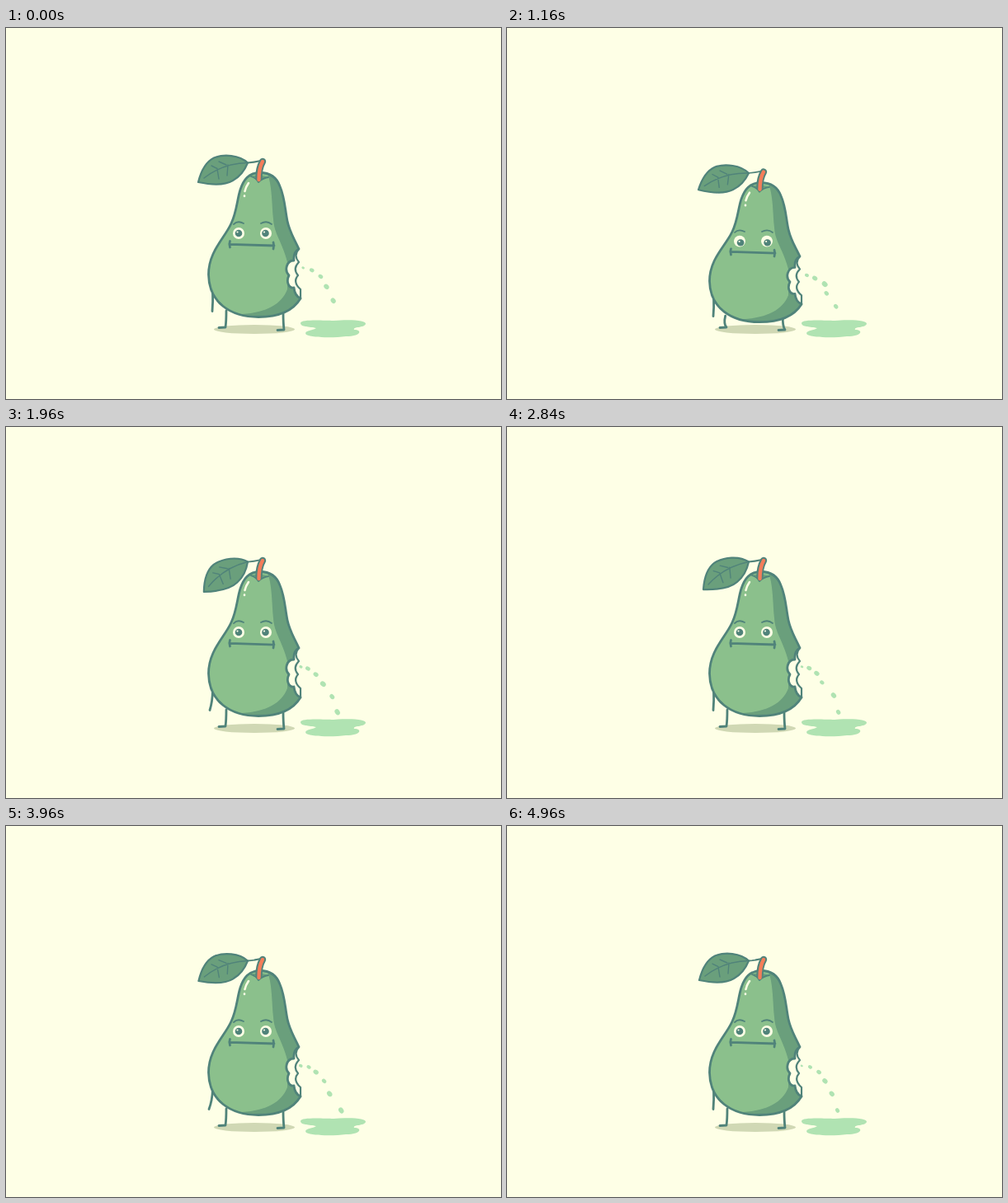
These frames come from a looping animation (600x450 px, 5 s). An HTML page:

```html
<!DOCTYPE html>
<html>
<head>
<meta charset="utf-8">
<style>
  html, body { margin: 0; width: 100%; height: 100%; overflow: hidden; background: #feffe6; }
  svg { display: block; width: 100vw; height: 100vh; }
  .line { fill: none; stroke: #50837a; stroke-width: 2.8; stroke-linecap: round; stroke-linejoin: round; }
  .thin { stroke-width: 1.8; }
  .cream { fill: #feffe6; }
  .dark { fill: #6a9f7c; }
  .juice { fill: #b0e3b2; }
</style>
</head>
<body>
<svg viewBox="0 0 600 450">
  <defs>
    <path id="pear" d="M355 268C349 255 344 248 341 234C338 219 338 206 332 192C328 181 320 175.500 308 175.500C294 175.500 288 184 284 196C280 208 280 222 273 237C265 255 245.500 271 245.500 299C246 333 272 350.500 306 350.500C330 350.500 348 343 357 328Q350 325 349 315C343 316 339 308 343 300C337 294 340 282 349 282Q348 272 355 268Z"/>
    <clipPath id="inside"><use href="#pear"/></clipPath>
  </defs>

  <ellipse cx="301" cy="365.5" rx="49" ry="5.5" fill="#d0d8b4"/>
  <path class="juice" d="M357 358C357 353 385 355 397 355C420 353 437 355 436 359C434 364 420 362 422 366C432 366 431 374 412 374C398 376 372 376 364 372C360 367 372 367 376 364C368 362 357 363 357 358Z"/>
  <path id="legs" class="line"/>
  <path id="arm" class="line"/>

  <g id="body">
    <path class="cream" d="M355 268Q348 276 355 284Q347 292 354 300Q347 308 357 317V328L347 318L339 306V290L349 278Z"/>
    <use href="#pear" fill="#8bc08c"/>
    <path class="dark" clip-path="url(#inside)" d="M316 174C323 190 322 215 324 232C325 250 335 260 341 284V317C334 335 316 345 286 347V356H364V174Z"/>
    <use href="#pear" class="line"/>
    <path class="line" style="stroke-width:2.2" d="M355 268Q348 276 355 284Q347 292 354 300Q347 308 357 317V328"/>
    <path d="M294 188Q290.500 193 289.500 198M289 203.500v.5" fill="none" stroke="#feffe6" stroke-width="2.6" stroke-linecap="round"/>

    <circle class="cream" cx="282" cy="249" r="7"/>
    <circle class="cream" cx="315" cy="249" r="7"/>
    <g id="pupils">
      <circle cx="282" cy="249" r="4.300" fill="#50837a"/>
      <circle cx="314.500" cy="249" r="4.300" fill="#50837a"/>
      <circle class="cream" cx="280.500" cy="247.500" r="1.100"/>
      <circle class="cream" cx="313" cy="247.500" r="1.100"/>
    </g>
    <path class="line thin" d="M276 238Q281 233 288 237M309 237Q316 233 322 238"/>
    <path class="line" d="M271 262.300L325 264M271.500 258.500Q270 262 271.500 266M324 260Q325.500 264 324 268"/>

    <path class="dark" d="M297 180Q307 177 318 181Q311 182 306 187Q303 182 297 180Z"/>
    <path class="line thin" d="M297 180Q303 182 306 187Q311 182 318 181"/>
    <path class="line thin" d="M293 163.500Q300 163 309 161"/>
    <path class="line" style="stroke-width:8.4" d="M306.500 181Q306.500 170 311 162"/>
    <path d="M306.500 184Q306.500 170 311 162" fill="none" stroke="#f47d5a" stroke-width="4.400" stroke-linecap="round"/>
    <g id="leaf">
      <path class="line" style="fill:#6a9f7c;stroke-width:2.2" d="M293 163.500C283 154 264 152.500 252 157.500C241 163 236 175 233 187C250 190.500 265 191 275 185C284 180 290 171 293 163.500Z"/>
      <path class="line thin" style="stroke-width:1.4" d="M293 163.500Q263 164 240 182M256 170.500L249 167M267 166L258 162M256 171L258 183M269 166L268 179"/>
    </g>
  </g>
  <g id="drops"></g>
</svg>
<script>
const LOOP = 5000, GAP = 125, FLIGHT = 680, COUNT = LOOP / GAP;
const el = id => document.getElementById(id);
const set = (node, attrs) => { for (const k in attrs) node.setAttribute(k, attrs[k]); };
const random = n => { const v = Math.sin(n * 12.9898 + 4.1) * 43758.5453; return v - Math.floor(v); };
const mod = (a, b) => (a % b + b) % b;

// Eased value between [time, value] keys
function keyed(keys, t) {
  const i = keys.findIndex(k => k[0] > t);
  const [t0, a] = keys[i - 1], [t1, b] = keys[i];
  return a + (b - a) * (1 - Math.cos(Math.PI * (t - t0) / (t1 - t0))) / 2;
}

const leafKeys = [[0, 0], [440, 0], [1160, 2.5], [1960, -13], [2840, -10], [3960, -1], [LOOP, 0]];
const armKeys = [[0, 0], [1300, 0], [1960, 3], [2840, 0], [3960, 4], [LOOP, 0]];
const dipAt = t => t < 2000 ? (1 - Math.cos(Math.PI * t / 1000)) / 2 : 0;

const drops = Array.from({ length: Math.ceil(FLIGHT / GAP) }, () => {
  const drop = document.createElementNS("http://www.w3.org/2000/svg", "ellipse");
  drop.setAttribute("class", "juice");
  return el("drops").appendChild(drop);
});

function drawDrops(t) {
  const shifted = t + 0.45 * GAP, latest = Math.floor(shifted / GAP);
  drops.forEach((drop, i) => {
    const id = mod(latest - i, COUNT);
    const s = (shifted - (latest - i) * GAP) / FLIGHT;
    const start = 291 + 9 * dipAt(mod(t - s * FLIGHT, LOOP));
    const x = 356 + (44 + 14 * random(id)) * s;
    const y = start - 8 * s + (360 - start) * s * s;
    const r = s < 1 ? Math.min(1.2 + 4 * s, 2.5) + random(id + 50) * .8 : 0;
    set(drop, { cx: x, cy: y, rx: r * 1.15, ry: r * .9, transform: `rotate(${20 + 40 * s} ${x} ${y})` });
  });
}

function draw(now) {
  const t = now % LOOP, dip = dipAt(t);
  const drop = 6.6 * dip, squash = 1 - 7.4 * dip * dip / 193, bend = 5 * dip;
  set(el("body"), { transform: `translate(0 ${351 + drop}) scale(1 ${squash}) translate(0 -351)` });
  set(el("leaf"), { transform: `rotate(${keyed(leafKeys, t)} 293 163.5)` });
  set(el("pupils"), { transform: `translate(${1.2 * dip} ${2 * dip})` });
  set(el("legs"), { d:
    `M${267 - bend / 2} ${343 + drop}Q${267 - bend} ${356 + drop / 2} 266 363L258 363.5` +
    `M${336 - bend / 3} ${344 + drop}Q${336 - bend / 2} ${358 + drop / 2} 337 366L329 366.5` });
  const swing = keyed(armKeys, t);
  set(el("arm"), { d: `M250.5 ${320 + drop}Q${251 - swing / 4} ${333 + drop} ${250 - swing} ${343.5 + drop}` });
  drawDrops(t);
  requestAnimationFrame(draw);
}
requestAnimationFrame(draw);
</script>
</body>
</html>
```
